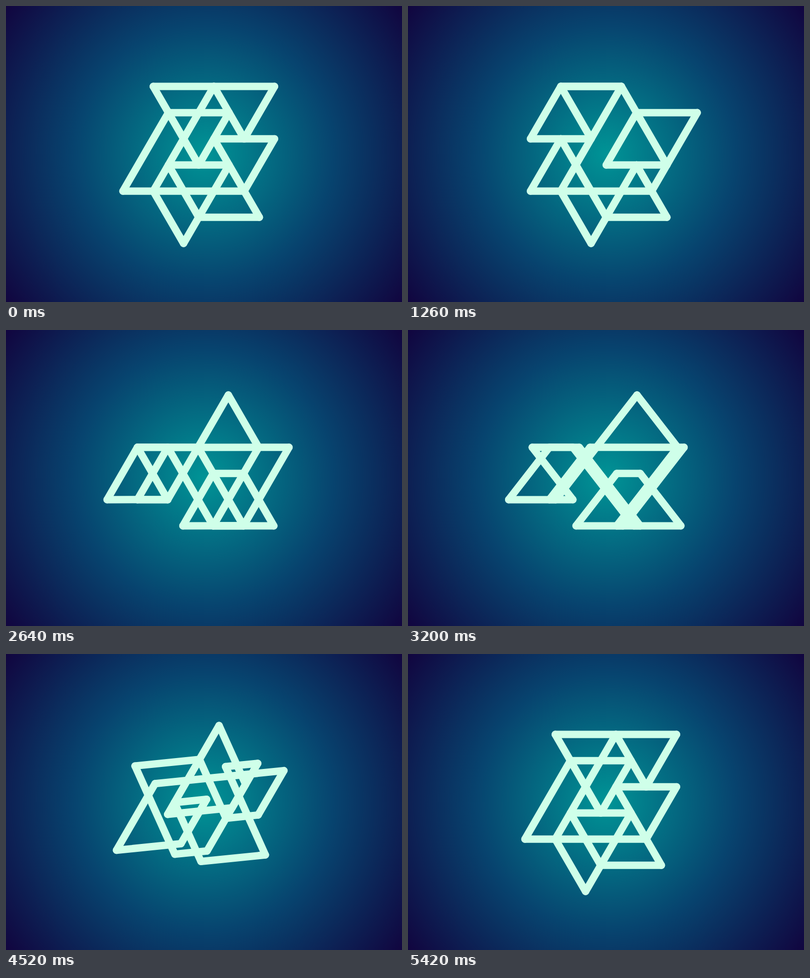
An HTML page without scripts that plays this animation: 800x600 px, repeating every 5.44 s.

```html
<!DOCTYPE html>
<html lang="en">
<head>
<meta charset="utf-8">
<title>Turning lattice loop</title>
<style>
@property --t { syntax: "<number>"; inherits: true; initial-value: 0; }
@property --m { syntax: "<number>"; inherits: true; initial-value: 1; }
@property --r { syntax: "<number>"; inherits: true; initial-value: 0; }
@property --c { syntax: "<number>"; inherits: true; initial-value: .57735; }
@property --s { syntax: "<number>"; inherits: true; initial-value: -.8165; }

html, body { margin: 0; width: 100%; height: 100%; overflow: hidden; }
body { background: #11053f; }
svg {
  display: block;
  width: 800px;
  height: 600px;
  background: radial-gradient(circle 500px at 400px 300px, #009496, #07446f 52%, #11053f);
  animation: turn 1360ms linear infinite, phase 5440ms step-end infinite;
}

/* four quarter turns: m mirrors the later two, r tilts the axis in every second one */
@keyframes turn { from { --t: 0; } to { --t: 1; } }
@keyframes phase {
  0% { --m: 1; --r: 0; }
  25% { --m: 1; --r: 1; }
  50% { --m: -1; --r: 0; }
  75%, 100% { --m: -1; --r: 1; }
}

/* eased angle between two isometric views */
.spin {
  --u: calc(1 - var(--t));
  --in: calc(var(--t) * var(--t) * var(--t));
  --out: calc(var(--u) * var(--u) * var(--u));
  --phi: calc(109.4712deg * (var(--in) / (var(--in) + var(--out)) - .5));
  --c: cos(var(--phi));
  --s: sin(var(--phi));
}

/* projected unit vectors of the three cube axes */
.axes {
  --n: calc(1 - var(--r));
  --ax: calc(var(--m) * (75 * var(--s) * var(--n) + 53.033 * var(--r)));
  --ay: calc(-53.033 * var(--m) * var(--c) * var(--r));
  --bx: calc(53.033 * (var(--c) * var(--n) + var(--r)));
  --by: calc(53.033 * (var(--n) + var(--c) * var(--r)));
  --zx: calc(-53.033 * var(--m) * var(--c) * var(--n));
  --zy: calc(var(--m) * (53.033 * var(--n) - 75 * var(--s) * var(--r)));
  transform: translate(400.5px, 300.5px) rotate(calc(30deg * var(--r)));
}

path {
  --i: calc(var(--a) - 40 / 44);
  --j: calc(var(--b) - 83 / 44);
  --k: calc(var(--z) + 13 / 44);
  fill: none;
  stroke: #cfffe9;
  stroke-width: 15px;
  stroke-linecap: round;
  vector-effect: non-scaling-stroke;
  transform: matrix(var(--vx), var(--vy), calc(-1 * var(--vy)), var(--vx),
    calc(var(--i) * var(--ax) + var(--j) * var(--bx) + var(--k) * var(--zx)),
    calc(var(--i) * var(--ay) + var(--j) * var(--by) + var(--k) * var(--zy)));
}
.a { --vx: var(--ax); --vy: var(--ay); }
.b { --vx: var(--bx); --vy: var(--by); }
.z { --vx: var(--zx); --vy: var(--zy); }
</style>
</head>
<body>
<svg viewBox="0 0 800 600">
  <g class="spin">
    <g class="axes">
      <path class="a" style="--a:0;--b:0;--z:-1" d="M0 0H2"/>
      <path class="b" style="--a:2;--b:0;--z:-1" d="M0 0H3"/>
      <path class="a" style="--a:1;--b:3;--z:-1" d="M0 0H1"/>
      <path class="z" style="--a:1;--b:3;--z:-1" d="M0 0H3"/>
      <path class="b" style="--a:1;--b:1;--z:2" d="M0 0H2"/>
      <path class="z" style="--a:1;--b:1;--z:-2" d="M0 0H4"/>
      <path class="a" style="--a:-1;--b:1;--z:-2" d="M0 0H2"/>
      <path class="z" style="--a:-1;--b:1;--z:-2" d="M0 0H2"/>
      <path class="a" style="--a:-1;--b:1;--z:0" d="M0 0H1"/>
      <path class="b" style="--a:0;--b:1;--z:0" d="M0 0H3"/>
      <path class="a" style="--a:0;--b:4;--z:0" d="M0 0H2"/>
      <path class="b" style="--a:2;--b:2;--z:0" d="M0 0H2"/>
      <path class="a" style="--a:1;--b:2;--z:0" d="M0 0H1"/>
      <path class="z" style="--a:1;--b:2;--z:-2" d="M0 0H2"/>
      <path class="a" style="--a:1;--b:2;--z:-2" d="M0 0H2"/>
      <path class="z" style="--a:3;--b:2;--z:-2" d="M0 0H3"/>
      <path class="a" style="--a:-1;--b:2;--z:1" d="M0 0H4"/>
      <path class="z" style="--a:-1;--b:2;--z:-1" d="M0 0H2"/>
      <path class="a" style="--a:-1;--b:2;--z:-1" d="M0 0H1"/>
      <path class="b" style="--a:0;--b:0;--z:-1" d="M0 0H2"/>
    </g>
  </g>
</svg>
</body>
</html>
```
